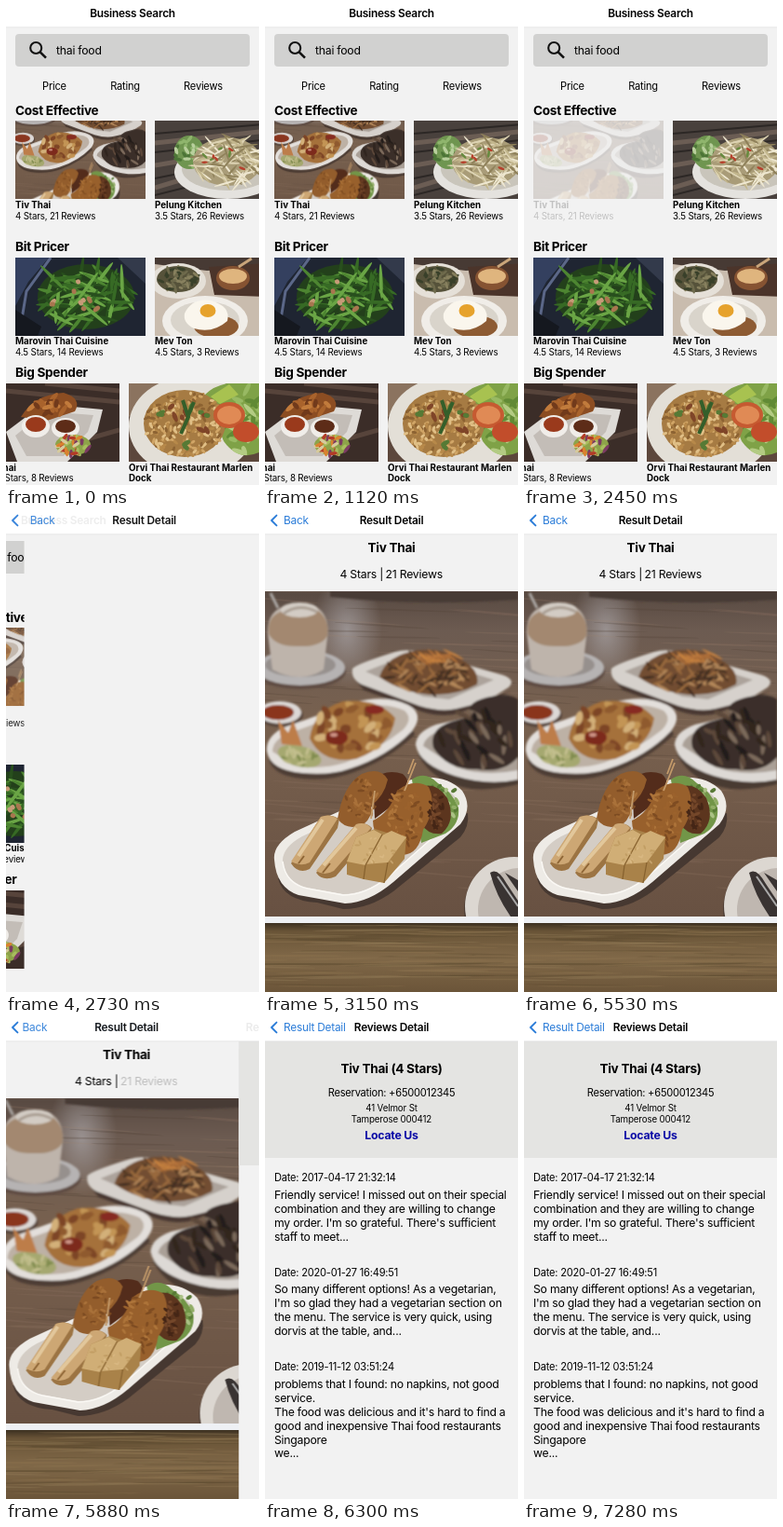
These frames come from a looping animation (272 px wide and 514 px high, 8 s). An HTML page:

```html
<!DOCTYPE html>
<html lang="en">
<head>
<meta charset="utf-8">
<title>Business Search</title>
<style>
html, body { margin: 0; width: 100%; height: 100%; overflow: hidden; background: #f2f2f2; }
#stage { display: block; width: 100vw; height: 100vh; }
text { font: 400 9.76px Inter, "Liberation Sans", sans-serif; letter-spacing: -.015em; fill: #000; white-space: pre; }
.mid { text-anchor: middle; }
.end { text-anchor: end; }
.title { font-weight: 600; font-size: 11.86px; letter-spacing: -.02em; }
.back { font-size: 11.86px; letter-spacing: -.02em; fill: #2b7cd8; }
.head { font-weight: 700; font-size: 13.6px; letter-spacing: -.02em; }
.name { font-weight: 700; letter-spacing: 0; }
.tab { font-size: 11.1px; letter-spacing: -.02em; }
.body { font-size: 12.25px; letter-spacing: -.02em; }
.link { font-weight: 700; font-size: 12.3px; letter-spacing: -.02em; fill: #0b0ba6; }

/* Navigation pushes share one settling spring: 2507 ms and 5858 ms, 440 ms each */
.spring {
  animation: 8s cubic-bezier(.25, .6, .25, 1) infinite;
  animation-timing-function: linear(0, .09, .264, .442, .594, .713, .801, .864, .908, .939, .96, .973, .983, .989, .993, .995, .997, 1);
}
.list { animation-name: list; }
.detail { animation-name: detail; }
.reviews { animation-name: reviews; }
.title1 { animation-name: title1; }
.title2 { animation-name: title2; }
.title3 { animation-name: title3; }
.back1 { animation-name: back1; }
.back2 { animation-name: back2; }
.chevron { animation-name: chevron; }
@keyframes list {
  0%, 31.34% { transform: none; }
  36.84%, 100% { transform: translateX(-82px); }
}
@keyframes detail {
  0%, 31.34% { transform: translateX(272px); }
  36.84%, 73.225% { transform: translateX(0); }
  78.725%, 100% { transform: translateX(-82px); }
}
@keyframes reviews {
  0%, 73.225% { transform: translateX(272px); }
  78.725%, 100% { transform: translateX(0); }
}
@keyframes title1 {
  0%, 31.34% { transform: none; opacity: 1; }
  36.84%, 100% { transform: translateX(-80px); opacity: 0; }
}
@keyframes title2 {
  0%, 31.34% { transform: translateX(176px); opacity: 0; }
  36.84%, 73.225% { transform: translateX(0); opacity: 1; }
  78.725%, 100% { transform: translateX(-81px); opacity: 0; }
}
@keyframes title3 {
  0%, 73.225% { transform: translateX(176px); opacity: 0; }
  78.725%, 100% { transform: none; opacity: 1; }
}
@keyframes back1 {
  0%, 31.34% { transform: translateX(80px); opacity: 0; }
  36.84%, 73.225% { transform: translateX(0); opacity: 1; }
  78.725%, 100% { transform: translateX(-30px); opacity: 0; }
}
@keyframes back2 {
  0%, 73.225% { transform: translateX(81px); opacity: 0; }
  78.725%, 100% { transform: none; opacity: 1; }
}
@keyframes chevron {
  0%, 31.34% { opacity: 0; }
  36.84%, 100% { opacity: 1; }
}

/* Touch feedback */
.pressCard { animation: pressCard 8s linear infinite; }
.pressLink { animation: pressLink 8s linear infinite; }
@keyframes pressCard {
  0%, 27.25% { opacity: 1; }
  29.1%, 31.5% { opacity: .2; }
  34.6%, 100% { opacity: 1; }
}
@keyframes pressLink {
  0%, 69.1% { opacity: 1; }
  71%, 73.6% { opacity: .22; }
  76.7%, 100% { opacity: 1; }
}

/* Content that arrives after its page */
.load { animation: 8s step-end infinite; }
.loadInfo { animation-name: loadInfo; }
.loadPhoto { animation-name: loadPhoto; }
.loadText { animation-name: loadText; }
@keyframes loadInfo { 0% { opacity: 0; } 35%, 100% { opacity: 1; } }
@keyframes loadPhoto { 0% { opacity: 0; } 37.6%, 100% { opacity: 1; } }
@keyframes loadText { 0% { opacity: 0; } 78.7%, 100% { opacity: 1; } }
.block { animation: block 8s step-end infinite; }
@keyframes block { 0% { transform: translateY(8px); } 78.7%, 100% { transform: none; } }
</style>
</head>
<body>
<svg id="stage" viewBox="0 0 272 514" preserveAspectRatio="none">
  <defs>
    <linearGradient id="wood" x2="0" y2="1">
      <stop offset="0" stop-color="#574941"/>
      <stop offset=".12" stop-color="#6c5b51"/>
      <stop offset=".4" stop-color="#78614f"/>
      <stop offset="1" stop-color="#685142"/>
    </linearGradient>
    <radialGradient id="glare">
      <stop offset="0" stop-color="#a8a3a5" stop-opacity=".75"/>
      <stop offset="1" stop-color="#a8a3a5" stop-opacity="0"/>
    </radialGradient>
    <linearGradient id="plank" x2="0" y2="1">
      <stop offset="0" stop-color="#3c3021"/>
      <stop offset=".12" stop-color="#695437"/>
      <stop offset=".5" stop-color="#806848"/>
      <stop offset="1" stop-color="#6b5539"/>
    </linearGradient>
    <filter id="soft"><feGaussianBlur stdDeviation="1"/></filter>
    <filter id="crisp"><feGaussianBlur stdDeviation=".45"/></filter>

    <!-- Table with shared dishes -->
    <symbol id="table" viewBox="0 0 272 349">
      <rect width="272" height="349" fill="url(#wood)"/>
      <ellipse cx="88" cy="42" rx="38" ry="62" fill="url(#glare)"/>
      <g id="grain"/>
      <g filter="url(#soft)">
        <path d="M70 0H272V9Q160 16 70 6Z" fill="#463a36"/>
        <ellipse cx="38" cy="86" rx="49" ry="19" fill="#5e4c43"/>
        <ellipse cx="38" cy="82" rx="48" ry="19" fill="#b6b3b3"/>
        <ellipse cx="38" cy="79" rx="38" ry="13" fill="#96908d"/>
        <path d="M3 46Q2 25 16 18Q36 8 57 18Q70 28 67 50L63 84Q38 100 8 84Z" fill="#beb4ab"/>
        <path d="M4 46Q2 27 17 22Q36 31 56 20Q70 30 67 48Q60 60 36 59Q12 60 4 46Z" fill="#a3886f"/>
        <ellipse cx="37" cy="20" rx="20" ry="8" fill="#d3ccc4"/>
        <path d="M20 24Q36 12 56 22" fill="none" stroke="#a89c91" stroke-width="3"/>
        <path d="M14 18L6 2" stroke="#aaa6a3" stroke-width="3"/>
        <path d="M98 96L106 106L168 129Q190 136 208 131L264 108L240 114Z" fill="#483931"/>
        <path d="M94 83Q98 78 140 65Q152 61 172 66L256 90Q270 95 262 103Q238 120 206 126Q190 130 166 123L104 100Q92 94 94 83Z" fill="#d6d1cc"/>
        <path d="M108 86L146 71Q160 68 176 73L246 95L198 116L170 113Z" fill="#aca39b"/>
        <path d="M123 92Q130 68 166 63Q190 61 204 70Q232 82 228 100Q206 112 178 111Q146 108 123 92Z" fill="#724d31"/>
        <g id="noodles"/>
        <ellipse cx="17" cy="133" rx="24" ry="13" fill="#58473d"/>
        <ellipse cx="16" cy="130" rx="23" ry="12" fill="#dcd8d6"/>
        <ellipse cx="14" cy="130" rx="17" ry="8" fill="#8a361f"/>
        <path d="M4 180Q8 198 40 201Q70 204 96 194Q134 180 161 154L158 146Z" fill="#4d3d34"/>
        <path d="M2 172Q0 158 18 147L96 119Q130 110 154 122Q172 132 158 150Q132 177 92 190Q70 198 40 195Q6 192 2 172Z" fill="#e3dfdb"/>
        <path d="M8 172Q8 160 24 153L98 126Q130 118 150 128Q160 137 148 149Q120 171 86 184Q60 192 32 187Z" fill="#bdb1a5"/>
        <ellipse cx="37" cy="177" rx="24" ry="11" fill="#a5a86f" transform="rotate(14 37 177)"/>
        <g id="garnish"/>
        <path d="M18 164L14 138L25 152L30 138L40 166Z" fill="#bd7d4a"/>
        <path d="M48 158Q52 128 84 118Q122 114 140 136Q136 166 98 180Q62 186 48 158Z" fill="#a5713b"/>
        <g id="fritters"/>
        <ellipse cx="77" cy="157" rx="12" ry="8" fill="#7d2a1c"/>
        <ellipse cx="118" cy="127" rx="10" ry="5" fill="#872c20"/>
        <ellipse cx="74" cy="154" rx="4" ry="2" fill="#cf9486"/>
        <path d="M164 174Q180 206 222 212Q246 214 272 207V190Z" fill="#4a3b33"/>
        <path d="M162 165Q162 151 184 143L272 123V202Q240 209 204 198Q166 186 162 165Z" fill="#ddd9d5"/>
        <path d="M170 166Q172 155 190 149L272 132V192Q236 199 206 189Z" fill="#aaa097"/>
        <path d="M181 168Q176 148 200 140L222 134Q214 120 238 114Q262 108 272 116V178Q256 196 228 191Q196 192 181 168Z" fill="#3b2f29"/>
        <g id="glazed"/>
      </g>
      <g filter="url(#crisp)">
        <path d="M14 308Q20 332 56 334L84 341Q112 341 138 322L210 264Q220 252 218 238Z" fill="#463831"/>
        <path d="M10 288Q8 272 32 258L150 204Q190 192 212 214Q224 232 210 250L138 312Q112 334 86 335L36 326Q12 318 10 288Z" fill="#eeebe6"/>
        <path d="M19 288Q20 274 40 263L150 211Q186 202 204 220Q212 234 200 247L132 306Q108 325 84 325L44 318Q20 310 19 288Z" fill="#d4cdc5"/>
        <path d="M19 290Q22 314 46 319L84 326Q108 326 132 307L201 246" fill="none" stroke="#fbf9f5" stroke-width="1.5"/>
        <path d="M158 202Q172 192 186 206Q200 214 208 232Q210 250 194 260L168 270Z" fill="#729648"/>
        <g id="lettuce"/>
        <path d="M116 202Q130 190 148 196Q158 204 150 220L118 244Z" fill="#532c1b"/>
        <path d="M168 210Q184 204 196 222Q206 246 190 260Q176 262 168 250Z" fill="#5c351e"/>
        <path d="M78 244Q84 208 104 196Q124 188 132 202Q128 220 114 230Q116 242 106 250Q88 258 78 244Z" fill="#935d2c"/>
        <path d="M116 246Q134 238 142 214Q160 200 176 210Q186 232 170 256Q166 282 148 283Q116 270 116 246Z" fill="#98602c"/>
        <g id="crust"/>
        <path d="M114 244L118 214M150 214L162 184M154 196L160 180" stroke="#c39a6a" stroke-width="1.8"/>
        <path d="M28 292L60 242Q70 238 80 244L78 254L48 298Q36 304 28 292ZM55 302L98 250Q108 247 115 254L112 264L76 306Q62 312 55 302Z" fill="#9c7443"/>
        <path d="M28 290L60 242Q70 238 78 244L48 291Q38 296 28 290ZM55 300L98 250Q108 247 114 254L74 300Q64 306 55 300Z" fill="#cda774"/>
        <path d="M36 284L62 245M63 294L98 254" stroke="#e2c79b" stroke-width="4"/>
        <path d="M36 292L42 284M62 302L70 292" stroke="#8f6636" stroke-width="2"/>
        <path d="M88 290L98 264L118 255L134 260L152 263L150 287L128 313L106 309L88 304Z" fill="#a98249"/>
        <path d="M88 290L98 264L117 256L126 261L108 294ZM107 293L122 264L136 257L152 264L132 291Z" fill="#d0ae76"/>
        <path d="M108 294L106 309M132 291L128 313M126 261L108 294" stroke="#87622f" stroke-width="1.3"/>
        <g id="crumbs"/>
        <circle cx="268" cy="341" r="54" fill="#4c3d34"/>
        <circle cx="268" cy="338" r="53" fill="#dcd7d1"/>
        <circle cx="274" cy="342" r="45" fill="#bfb7b0"/>
        <path d="M242 302Q250 296 260 314L272 332V349H264Q248 326 242 302ZM258 302L272 310V322Z" fill="#393332"/>
        <path d="M250 306L272 338" stroke="#aaa" stroke-width="2"/>
      </g>
    </symbol>
    <path id="chev" d="M12.4 2.6L7 8L12.4 13.4" fill="none" stroke="#2b7cd8" stroke-width="1.9" stroke-linecap="round" stroke-linejoin="round"/>
  </defs>

  <rect width="272" height="514" fill="#f2f2f2"/>

  <g class="spring list">
    <rect x="10" y="30" width="252" height="35" rx="4" fill="#d1d1d0"/>
    <circle cx="32.2" cy="45" r="6" fill="none" stroke="#111" stroke-width="2.1"/>
    <path d="M36.6 49.4L43 55.6" stroke="#111" stroke-width="2.6"/>
    <text class="body" x="54" y="52">thai food</text>
    <text class="tab mid" x="52" y="90">Price</text>
    <text class="tab mid" x="128" y="90">Rating</text>
    <text class="tab mid" x="212" y="90">Reviews</text>

    <text class="head" x="10" y="116.5">Cost Effective</text>
    <g class="pressCard">
      <svg x="10" y="123" width="140" height="84" viewBox="0 93 272 163"><use href="#table" width="272" height="349"/></svg>
      <text class="name" x="10" y="216.5">Tiv Thai</text>
      <text x="10" y="228.5">4 Stars, 21 Reviews</text>
    </g>
    <svg x="160" y="123" width="140" height="84">
      <rect width="140" height="84" fill="#49413d"/>
      <path d="M0 14L140 2M0 34L140 18M0 62L60 50M0 80L40 70" stroke="#2c2725" stroke-width="2"/>
      <path d="M0 24L140 9M0 48L60 38M0 72L40 60" stroke="#6b5d54" stroke-width="5"/>
      <ellipse cx="78" cy="55" rx="57" ry="29" fill="#e4e2de"/>
      <ellipse cx="78" cy="52" rx="49" ry="23" fill="#c9c5bb"/>
      <ellipse cx="37" cy="34" rx="16" ry="18" fill="#6f9550"/>
      <g id="cabbage"/>
      <ellipse cx="78" cy="44" rx="37" ry="26" fill="#a99c78"/>
      <g id="shreds"/>
    </svg>
    <text class="name" x="160" y="216.5">Pelung Kitchen</text>
    <text x="160" y="228.5">3.5 Stars, 26 Reviews</text>

    <text class="head" x="10" y="263">Bit Pricer</text>
    <svg x="10" y="270" width="140" height="84">
      <rect width="140" height="84" fill="#1f2532"/>
      <path d="M0 0H36L14 26L0 52Z" fill="#34405f"/>
      <path d="M38 0L12 36L4 84" stroke="#5b6788" stroke-width="3" fill="none"/>
      <path d="M110 0H140V28Z" fill="#333a4b"/>
      <ellipse cx="76" cy="42" rx="52" ry="35" fill="#23401b"/>
      <g id="beans"/>
      <path d="M0 56L28 74L24 84H0Z" fill="#15181f"/>
    </svg>
    <text class="name" x="10" y="363">Marovin Thai Cuisine</text>
    <text x="10" y="375">4.5 Stars, 14 Reviews</text>
    <svg x="160" y="270" width="140" height="84">
      <rect width="140" height="84" fill="#c9bcae"/>
      <path d="M0 0H140V9L56 14L0 7Z" fill="#473a34"/>
      <path d="M58 10L120 6V42L64 40Z" fill="#4b342a"/>
      <ellipse cx="25" cy="25" rx="30" ry="19" fill="#e5e0d8"/>
      <ellipse cx="25" cy="23" rx="23" ry="14" fill="#56523a"/>
      <g id="mince"/>
      <ellipse cx="84" cy="22" rx="18" ry="13" fill="#865332"/>
      <ellipse cx="84" cy="20" rx="15" ry="8" fill="#dfb57e"/>
      <path d="M90 10L104 1" stroke="#c9a57a" stroke-width="3"/>
      <ellipse cx="54" cy="68" rx="46" ry="27" fill="#f0ede8"/>
      <ellipse cx="54" cy="67" rx="37" ry="20" fill="#d9d4cb"/>
      <ellipse cx="66" cy="74" rx="24" ry="12" fill="#8d5b33"/>
      <path d="M32 60Q40 43 60 46Q82 52 78 68Q62 82 42 76Q30 70 32 60Z" fill="#faf6ed"/>
      <ellipse cx="57" cy="57" rx="8.5" ry="7" fill="#e6a22c"/>
    </svg>
    <text class="name" x="160" y="363">Mev Ton</text>
    <text x="160" y="375">4.5 Stars, 3 Reviews</text>

    <text class="head" x="10" y="398">Big Spender</text>
    <svg x="-18" y="405" width="140" height="84">
      <rect width="140" height="84" fill="#3b2d28"/>
      <path d="M18 8L140 20M60 0L140 8M90 64L140 50" stroke="#57443b" stroke-width="5"/>
      <path d="M18 52L58 22L122 28L116 52L84 84H30Z" fill="#dedbd7"/>
      <path d="M28 56L60 30L112 34L106 52L80 78H40Z" fill="#c3bdb7"/>
      <path d="M34 36Q48 12 80 10Q100 16 92 30L62 40Z" fill="#8c4d22"/>
      <g id="crispy"/>
      <ellipse cx="50" cy="46" rx="15" ry="12" fill="#f0ede9"/>
      <ellipse cx="50" cy="44" rx="11" ry="8" fill="#9a3a1c"/>
      <ellipse cx="82" cy="48" rx="15" ry="11" fill="#f0ede9"/>
      <ellipse cx="82" cy="46" rx="11" ry="7" fill="#5d2c18"/>
      <ellipse cx="90" cy="66" rx="19" ry="11" fill="#8da349"/>
      <g id="salad"/>
    </svg>
    <text class="name end" x="11" y="498.5">Lu Thai</text>
    <text x="-18" y="510">4.5 Stars, 8 Reviews</text>
    <svg x="132" y="405" width="140" height="84">
      <rect width="140" height="84" fill="#5c473c"/>
      <path d="M0 0H38L0 36Z" fill="#8b735f"/>
      <ellipse cx="68" cy="46" rx="68" ry="54" fill="#e3dfd7"/>
      <path d="M82 12Q100 -6 140 0V74Q118 84 102 62Z" fill="#7fa247"/>
      <g id="leaf"/>
      <ellipse cx="60" cy="43" rx="44" ry="36" fill="#a67b43"/>
      <g id="rice"/>
      <path d="M88 14L108 1L118 12L98 22Z" fill="#a8c250"/>
      <ellipse cx="108" cy="34" rx="17" ry="14" fill="#c65a31"/>
      <ellipse cx="108" cy="34" rx="13" ry="10" fill="#e08a55"/>
      <ellipse cx="126" cy="52" rx="14" ry="11" fill="#c24d2b"/>
      <path d="M58 18L64 36L56 54M64 34L70 20" stroke="#345f2a" stroke-width="4" fill="none"/>
    </svg>
    <text class="name" x="132" y="498.5">Orvi Thai Restaurant Marlen</text>
    <text class="name" x="132" y="510">Dock</text>
  </g>

  <g class="spring detail">
    <rect y="23" width="272" height="491" fill="#f2f2f2"/>
    <g class="load loadInfo">
      <text class="head mid" x="136" y="42">Tiv Thai</text>
      <text class="body end" x="127" y="70">4 Stars |</text>
      <text class="body pressLink" x="129.6" y="70">21 Reviews</text>
    </g>
    <g class="load loadPhoto">
      <use href="#table" y="84" width="272" height="349"/>
      <rect y="433" width="272" height="8" fill="#eef0f4"/>
      <svg y="440" width="272" height="74">
        <rect width="272" height="74" fill="url(#plank)"/>
        <g id="plankGrain"/>
      </svg>
    </g>
  </g>

  <g class="spring reviews">
    <rect y="23" width="272" height="491" fill="#f2f2f2"/>
    <rect class="block" y="23" width="272" height="125" fill="#e4e4e2"/>
    <rect y="23" width="272" height="20" fill="#e4e4e2"/>
    <g class="load loadText">
      <text class="head mid" x="136" y="57">Tiv Thai (4 Stars)</text>
      <text class="tab mid" x="136" y="82">Reservation: +6500012345</text>
      <text class="mid" x="136" y="97.5">41 Velmor St</text>
      <text class="mid" x="136" y="109.5">Tamperose 000412</text>
      <text class="link mid" x="136" y="128">Locate Us</text>
      <g id="reviewList"/>
    </g>
  </g>

  <rect width="272" height="23" fill="#fff"/>
  <rect y="22.6" width="272" height=".5" fill="#d4d4d4"/>
  <text class="title mid spring title1" x="136" y="12">Business Search</text>
  <text class="title mid spring title2" x="136" y="12">Result Detail</text>
  <text class="title mid spring title3" x="136" y="12">Reviews Detail</text>
  <use class="spring chevron" href="#chev"/>
  <text class="back spring back1" x="20" y="12">Back</text>
  <text class="back spring back2" x="20" y="12">Result Detail</text>
</svg>
<script>
const NS = "http://www.w3.org/2000/svg";
const byId = id => document.getElementById(id);

function add(parent, tag, attrs, content = "") {
  const node = document.createElementNS(NS, tag);
  for (const key in attrs) node.setAttribute(key, attrs[key]);
  node.textContent = content;
  parent.append(node);
}

let seed = 7;
const random = () => (seed = (seed * 16807) % 2147483647) / 2147483647;

// Fills an elliptical heap with small turned pieces.
function scatter(id, count, [cx, cy, w, h], colors, rx, ry, spread = 180, tilt = 0) {
  for (let i = 0; i < count; i++) {
    const angle = random() * Math.PI * 2, reach = Math.sqrt(random());
    const x = cx + Math.cos(angle) * reach * w, y = cy + Math.sin(angle) * reach * h;
    const turn = tilt + (random() - .5) * spread;
    add(byId(id), "ellipse", {
      rx: rx * (.6 + random() * .6), ry, fill: colors[i % colors.length],
      transform: `translate(${x.toFixed(1)} ${y.toFixed(1)}) rotate(${turn.toFixed()})`
    });
  }
}

scatter("grain", 90, [136, 175, 190, 240], ["#8b725f40", "#4d3c3240", "#9a806a30"], 60, .9, 4, 3);
scatter("plankGrain", 70, [136, 38, 170, 42], ["#9a825c50", "#55432c50", "#8f765060"], 70, .8, 2);
scatter("noodles", 70, [176, 88, 44, 20], ["#9a6a3e", "#553a27", "#b3875a", "#432f22"], 8, 1.5, 120);
scatter("noodles", 14, [186, 70, 22, 6], ["#c5803f", "#b0703a"], 11, 1.2, 70, 15);
scatter("garnish", 20, [37, 177, 20, 8], ["#c4c090", "#7f8b4e", "#b5b47c"], 5, 1.5);
scatter("fritters", 36, [95, 147, 40, 26], ["#c39555", "#8f5a2f", "#d3b079", "#7d4425"], 7, 4);
scatter("glazed", 34, [226, 158, 38, 28], ["#241d1a", "#5d483a", "#30251f", "#7c6a5b"], 9, 2.5, 70, 60);
scatter("lettuce", 26, [190, 228, 18, 24], ["#91ad66", "#587a36", "#aac184"], 4, 2);
scatter("crust", 40, [104, 222, 17, 22], ["#a9713a", "#7c4b22", "#9c6530"], 3.5, 1.4);
scatter("crust", 54, [150, 242, 20, 30], ["#ad743a", "#7e4c22", "#9b622d"], 3.5, 1.4);
scatter("crust", 26, [185, 236, 9, 20], ["#74472a", "#452616"], 3.5, 1.5);
scatter("crumbs", 24, [120, 280, 24, 16], ["#dfc08c80", "#b48d5280"], 2.5, 1);
scatter("cabbage", 26, [37, 34, 15, 18], ["#8fb56d", "#4c7537", "#b8cf9c"], 4, 1.8);
scatter("shreds", 85, [78, 44, 36, 25], ["#ddd3b3", "#c3b78d", "#eee7d0", "#8f815a"], 12, 1.1, 130, 10);
scatter("shreds", 9, [80, 42, 28, 18], ["#b5402c", "#668a3e"], 4, 1.3);
scatter("beans", 75, [76, 42, 46, 31], ["#4d8531", "#376a25", "#6aa545", "#284f1d"], 17, 1.9, 150, -20);
scatter("beans", 9, [66, 38, 34, 22], ["#a8764f", "#c79b78"], 4, 2.5);
scatter("mince", 45, [25, 23, 21, 12], ["#6e6a4c", "#39402a", "#87805e"], 4, 1.5);
scatter("crispy", 20, [66, 23, 22, 9], ["#a9632c", "#713a1b", "#c17b3c"], 7, 2.5);
scatter("salad", 30, [90, 66, 18, 10], ["#d9822f", "#7b3b62", "#a8bd5e", "#d7cb9c", "#b33b27"], 5, 1.8);
scatter("leaf", 30, [122, 40, 20, 36], ["#98b963", "#618a35", "#b3cb83"], 8, 2.5);
scatter("rice", 210, [60, 43, 43, 35], ["#d0a566", "#b7894a", "#e0bf86", "#8c6232"], 3.2, 1.5);
scatter("rice", 14, [58, 44, 34, 26], ["#7f4528", "#567a35"], 5, 2.5);

const reviews = [
  [173, "2017-04-17 21:32:14", [
    "Friendly service! I missed out on their special",
    "combination and they are willing to change",
    "my order. I'm so grateful. There's sufficient",
    "staff to meet..."]],
  [274.5, "2020-01-27 16:49:51", [
    "So many different options! As a vegetarian,",
    "I'm so glad they had a vegetarian section on",
    "the menu. The service is very quick, using",
    "dorvis at the table, and..."]],
  [376, "2019-11-12 03:51:24", [
    "problems that I found: no napkins, not good",
    "service.",
    "The food was delicious and it's hard to find a",
    "good and inexpensive Thai food restaurants",
    "Singapore",
    "we..."]]
];
for (const [y, date, body] of reviews) {
  add(byId("reviewList"), "text", { class: "tab", x: 10, y }, "Date: " + date);
  body.forEach((line, i) =>
    add(byId("reviewList"), "text", { class: "body", x: 10, y: y + 18.7 + i * 14.95 }, line));
}
</script>
</body>
</html>
```
